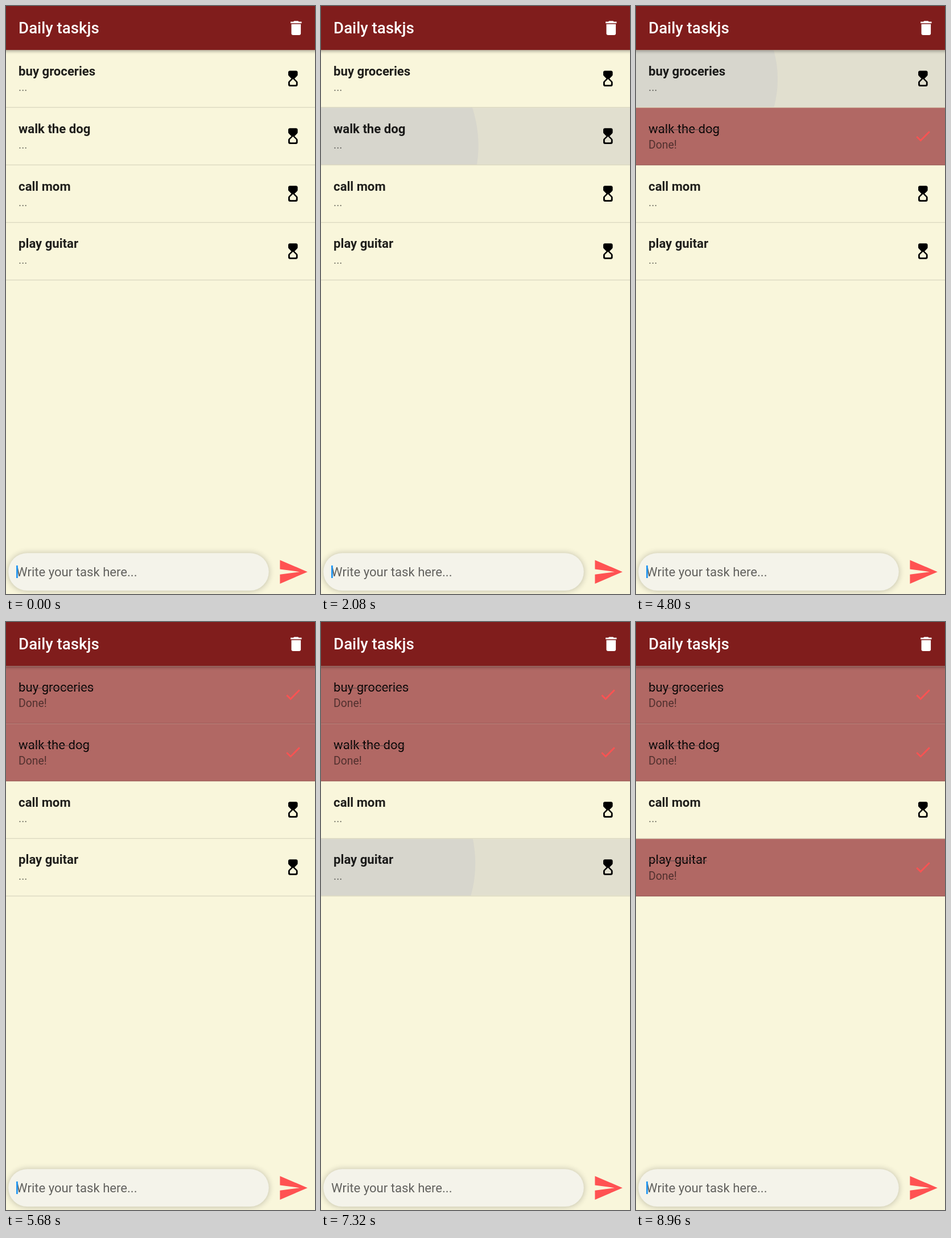
An HTML page for the animation above (9 s loop, 543x1031 px).

```html
<!DOCTYPE html>
<html lang="en">
<head>
<meta charset="utf-8">
<title>Daily tasks</title>
<style>
  html, body { margin: 0; width: 100%; height: 100%; overflow: hidden; background: #f9f6db; }
  svg { display: block; width: 100%; height: 100%; font-family: Roboto, "Liberation Sans", sans-serif; }
</style>
</head>
<body>
<svg id="stage" viewBox="0 0 543 1031" xmlns="http://www.w3.org/2000/svg">
  <defs>
    <filter id="barShadow" x="-10%" y="-30%" width="120%" height="180%"><feGaussianBlur stdDeviation="2.6"/></filter>
    <filter id="pillShadow" x="-10%" y="-60%" width="120%" height="220%"><feGaussianBlur stdDeviation="6"/></filter>
  </defs>
  <rect width="543" height="1031" fill="#f9f6db"/>
  <g id="list"></g>

  <rect x="-10" y="3" width="563" height="77" opacity=".27" filter="url(#barShadow)"/>
  <rect width="543" height="77.1" fill="#801d1c"/>
  <text x="22.1" y="48.2" font-size="27.65" font-weight="500" fill="#fff">Daily taskjs</text>
  <path transform="translate(493.2 22) scale(1.3827)" fill="#fff"
    d="M6 19c0 1.1.9 2 2 2h8c1.1 0 2-.9 2-2V7H6v12zM19 4h-3.5l-1-1h-5l-1 1H5v2h14V4z"/>

  <rect x="4.2" y="960" width="457.6" height="65.5" rx="32.75" opacity=".24" filter="url(#pillShadow)"/>
  <rect x="4.2" y="959.2" width="457.6" height="65.8" rx="32.9" fill="#f4f3ea"/>
  <text x="18" y="999.7" font-size="22.12" fill-opacity=".6">Write your task here...</text>
  <rect id="caret" x="18" y="981" width="2.8" height="22" fill="#2196f3"/>
  <path transform="translate(476.8 964.5) scale(2.3045)" fill="#ff5252"
    d="M2.01 21L23 12 2.01 3 2 10l15 2-15 2z"/>
</svg>
<script>
const LOOP = 9000, STEP = 40;
const DP = 1.3827;              // pixels per layout unit
const WIDTH = 543, BAR = 56 * DP, TILE = 72 * DP, ROW = 73 * DP;
const HOLD = 450;               // press length before a task is ticked off
const HOURGLASS = "M8 2c-1.1 0-2 .9-2 2v3.17c0 .53.21 1.04.59 1.42L10 12l-3.42 3.42c-.37.38-.58.89-.58 1.42V20c0 1.1.9 2 2 2h8c1.1 0 2-.9 2-2v-3.16c0-.53-.21-1.04-.58-1.41L14 12l3.41-3.4c.38-.38.59-.89.59-1.42V4c0-1.1-.9-2-2-2H8zm8 14.5V19c0 .55-.45 1-1 1H9c-.55 0-1-.45-1-1v-2.5l4-4 4 4z";
const CHECK = "M9 16.17L4.83 12l-1.42 1.41L9 19 21 7l-1.41-1.41z";

// x and y are the finger position inside the row
const tasks = [
  { name: "buy groceries", press: 4411, x: 60, y: 50.6 },
  { name: "walk the dog", press: 1637, x: 61, y: 66.6 },
  { name: "call mom" },
  { name: "play guitar", press: 6887, x: 61, y: 42.8 },
];

function add(parent, tag, attrs, text) {
  const el = document.createElementNS("http://www.w3.org/2000/svg", tag);
  for (const key in attrs) el.setAttribute(key, attrs[key]);
  if (text) el.textContent = text;
  parent.appendChild(el);
  return el;
}

function show(el, on) {
  el.setAttribute("display", on ? "inline" : "none");
}

function addLabels(parent, title, note, weight, ink, icon, iconFill) {
  const x = 16 * DP;
  const label = add(parent, "text", { x, y: 32 * DP, "font-size": 16 * DP, "font-weight": weight, "fill-opacity": ink }, title);
  add(parent, "text", { x, y: 52 * DP, "font-size": 14 * DP, "fill-opacity": .54 }, note);
  add(parent, "path", {
    d: icon, fill: iconFill,
    transform: `translate(${WIDTH - 40 * DP} ${24 * DP}) scale(${DP})`,
  });
  return label;
}

function buildRow(task, i) {
  const list = document.getElementById("list");
  const row = add(list, "g", { transform: `translate(0 ${BAR + i * ROW})` });

  const clip = add(row, "clipPath", { id: "tile" + i });
  add(clip, "rect", { width: WIDTH, height: TILE });

  task.open = add(row, "g", {});
  const ink = add(task.open, "g", { "clip-path": `url(#tile${i})` });
  task.glow = add(ink, "rect", { width: WIDTH, height: TILE, fill: "#bcbcbc" });
  task.splash = add(ink, "circle", { cx: task.x || 0, cy: task.y || 0, fill: "#c8c8c8", "fill-opacity": .4 });
  addLabels(task.open, task.name, "...", 700, .88, HOURGLASS, "#000");

  task.done = add(row, "g", {});
  add(task.done, "rect", { width: WIDTH, height: ROW, fill: "#b16864" });
  task.label = addLabels(task.done, task.name, "Done!", 400, .95, CHECK, "#ff5252");
  task.strike = add(task.done, "rect", { x: 16 * DP, y: 38, height: 1.2, fill: "#64494a" });
  task.strike.setAttribute("width", task.label.getComputedTextLength());

  add(row, "rect", { y: TILE, width: WIDTH, height: DP, "fill-opacity": .12 });
}

function drawRow(task, t) {
  const age = task.press === undefined ? -1 : t - task.press;
  const done = age >= HOLD;
  show(task.open, !done);
  show(task.done, done);
  if (done) return;
  const held = Math.max(0, age);
  const reach = Math.hypot(WIDTH - task.x, Math.max(task.y, TILE - task.y)) || 0;
  task.glow.setAttribute("fill-opacity", .4 * Math.min(1, held / 200));
  task.splash.setAttribute("r", reach * held / 1000);
}

const caret = document.getElementById("caret");

function draw(time) {
  const t = Math.floor((time % LOOP) / STEP) * STEP;
  tasks.forEach(task => drawRow(task, t));
  show(caret, (t + 410) % 1000 < 500);
}

tasks.forEach(buildRow);
draw(0);
const start = performance.now();
function tick() {
  draw(performance.now() - start);
  requestAnimationFrame(tick);
}
requestAnimationFrame(tick);
</script>
</body>
</html>
```
